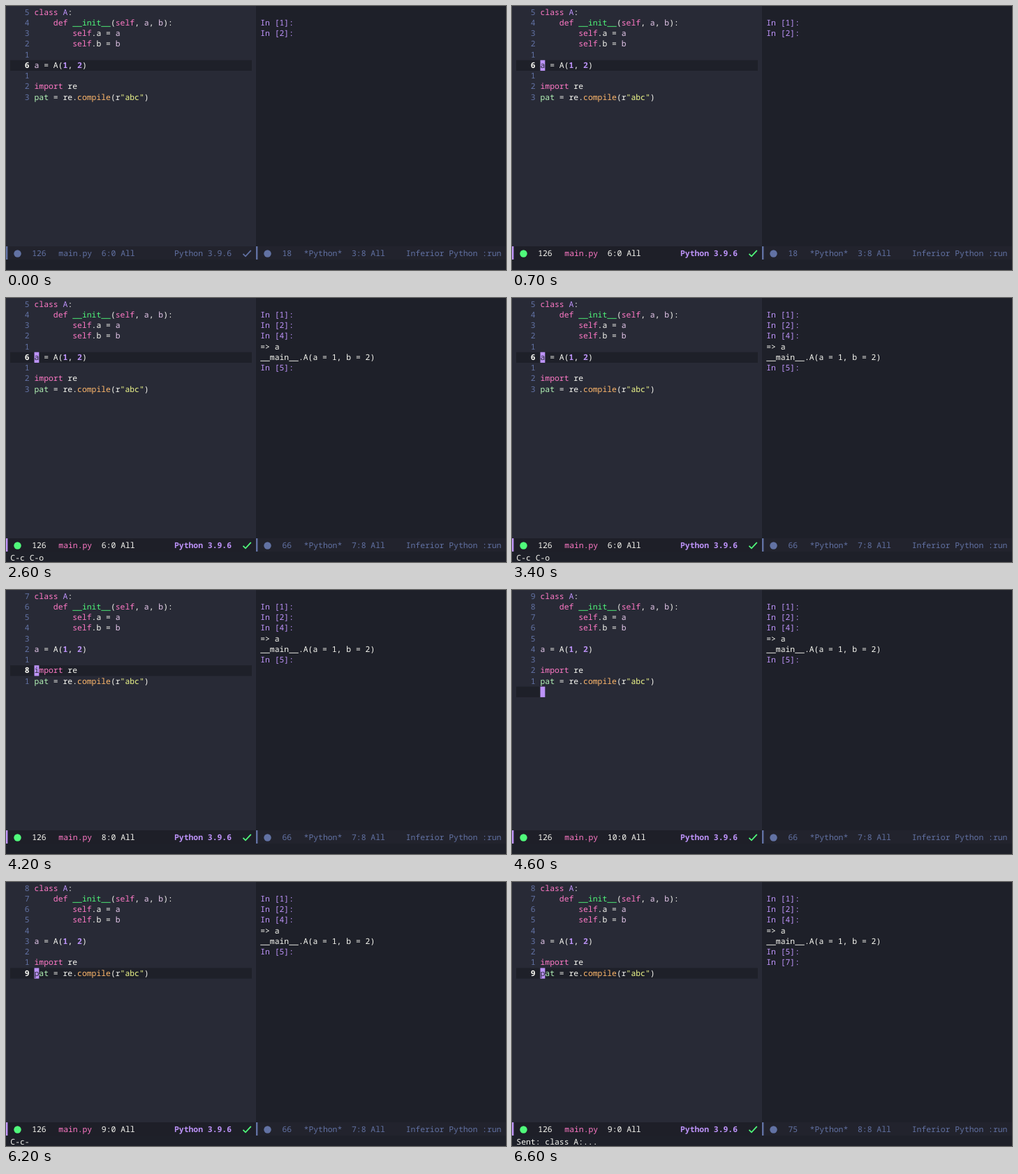
Write an HTML page with a canvas that moves like this. It is 716 px wide and 379 px high and loops after 8000 ms.

```html
<!DOCTYPE html>
<html lang="en">
<head>
<meta charset="utf-8">
<title>Python editor and console</title>
<style>
html, body { margin: 0; width: 100%; height: 100%; overflow: hidden; background: #1e2029; }
canvas { display: block; width: 716px; height: 379px; }
</style>
</head>
<body>
<canvas id="stage"></canvas>
<script>
const W = 716, H = 379, LOOP = 8000;
const CHAR = 6.84, ROW = 15.24, BASE = 12.7;
const LEFT = 6.3, CODE = LEFT + 5 * CHAR, RIGHT = 364.2;
const FONT = '11.4px "Noto Sans Mono", "DejaVu Sans Mono", monospace';

const C = {
  bg: '#282a36', dark: '#1e2029', bar: '#22232d', barOn: '#1e1f28',
  fg: '#f8f8f2', dim: '#6272a4', pink: '#ff79c6', purple: '#bd93f9',
  green: '#50fa7b', orange: '#ffb86c', yellow: '#f1fa8c',
  param: '#e6c8ec', name: '#b4f5b8'
};

// Each line is a list of [text, colour, bold] runs.
const code = [
  [['class', 'pink'], [' A', 'purple'], [':', 'fg']],
  [['    def', 'pink'], [' __init__', 'green'], ['(', 'fg'], ['self', 'pink'], [', ', 'fg'],
   ['a', 'param'], [', ', 'fg'], ['b', 'param'], ['):', 'fg']],
  [['        self', 'pink'], ['.a = ', 'fg'], ['a', 'param']],
  [['        self', 'pink'], ['.b = ', 'fg'], ['b', 'param']],
  [],
  [['a', 'param'], [' = A(', 'fg'], ['1', 'purple', true], [', ', 'fg'], ['2', 'purple', true], [')', 'fg']],
  [],
  [['import', 'pink'], [' re', 'fg']],
  [['pat', 'name'], [' = re.', 'fg'], ['compile', 'orange'], ['(r', 'fg'], ['"abc"', 'yellow'], [')', 'fg']]
];

const prompt = n => ['In [' + n + ']:', 'purple'];
const output = [
  prompt(1), prompt(2), prompt(4), ['=> a', 'fg'],
  ['__main__.A(a = 1, b = 2)', 'fg'], prompt(5), prompt(7)
];

// Changes applied in order of time.
const steps = [
  { at: 0, active: false, line: 6, shown: 2, size: 18, pos: '3:8', echo: '' },
  { at: 600, active: true },
  { at: 1200, echo: 'C-c-' },
  { at: 1400, echo: 'Sent: class A:...', shown: 3, size: 27, pos: '4:8' },
  { at: 2000, echo: 'C-c-' },
  { at: 2600, echo: 'C-c C-o', shown: 6, size: 66, pos: '7:8' },
  { at: 3900, line: 7, echo: '' },
  { at: 4100, line: 8 },
  { at: 4300, line: 9 },
  { at: 4500, line: 10 },
  { at: 4800, line: 9 },
  { at: 5500, echo: 'Compiled regular expression object.' },
  { at: 6200, echo: 'C-c-' },
  { at: 6500, echo: 'Sent: class A:...', shown: 7, size: 75, pos: '8:8' }
];

const canvas = document.getElementById('stage');
const ctx = canvas.getContext('2d');
const ratio = window.devicePixelRatio || 1;
canvas.width = W * ratio;
canvas.height = H * ratio;
ctx.scale(ratio, ratio);
ctx.textRendering = 'geometricPrecision';

function rect(x, y, w, h, color) {
  ctx.fillStyle = C[color];
  ctx.fillRect(x, y, w, h);
}

function text(str, x, y, color, bold) {
  ctx.font = (bold ? 'bold ' : '') + FONT;
  ctx.fillStyle = C[color];
  ctx.fillText(str, x, y);
}

function dot(x, color) {
  ctx.fillStyle = C[color];
  ctx.beginPath();
  ctx.arc(x, 355.5, 5.2, 0, 2 * Math.PI);
  ctx.fill();
}

function check(color) {
  ctx.strokeStyle = C[color];
  ctx.lineWidth = 1.8;
  ctx.beginPath();
  ctx.moveTo(339.5, 355.8);
  ctx.lineTo(343, 359.3);
  ctx.lineTo(350.8, 350.8);
  ctx.stroke();
}

function drawEditor(s) {
  const cur = s.line - 1, top = 1.5 + cur * ROW, last = cur === code.length;
  rect(0, 0, 358, 345, 'bg');
  rect(6, top, last ? CODE - 6 : 346, ROW, 'dark');
  code.forEach((runs, i) => {
    const y = BASE + i * ROW, here = i === cur;
    text(String(here ? s.line : Math.abs(i - cur)), LEFT + 3 * CHAR, y, here ? 'fg' : 'dim', here);
    let x = CODE;
    for (const [str, color, bold] of runs) {
      text(str, x, y, color, bold);
      x += str.length * CHAR;
    }
  });
  if (!s.active) return;
  rect(CODE, top, CHAR, ROW, 'purple');
  if (!last && code[cur].length) text(code[cur][0][0][0], CODE, BASE + cur * ROW, 'bg');
}

function drawConsole(s) {
  rect(358, 0, 358, 345, 'dark');
  output.slice(0, s.shown).forEach(([str, color], i) =>
    text(str, RIGHT, BASE + (i + 1) * ROW, color));
}

function drawBars(s) {
  const y = 359.4, pick = color => s.active ? color : 'dim';
  rect(0, 345, 358, 19, s.active ? 'barOn' : 'bar');
  rect(0, 345, 2.4, 19, pick('purple'));
  dot(16.5, pick('green'));
  text('126', 37.2, y, pick('fg'));
  text('main.py', 75.3, y, pick('pink'));
  text(s.line + ':0 All', 136.8, y, pick('fg'));
  text('Python 3.9.6', 241, y, pick('purple'), s.active);
  check(pick('green'));

  rect(358, 345, 358, 19, 'bar');
  rect(358, 345, 2.4, 19, 'dim');
  dot(374.5, 'dim');
  text(String(s.size), 395.4, y, 'dim');
  text('*Python*', 426.6, y, 'dim');
  text(s.pos + ' All', 495, y, 'dim');
  text('Inferior Python :run', 572.7, y, 'dim');
}

function draw(now) {
  const t = now % LOOP;
  const s = Object.assign({}, ...steps.filter(step => step.at <= t));
  drawEditor(s);
  drawConsole(s);
  drawBars(s);
  rect(0, 364, W, 15, 'dark');
  text(s.echo, LEFT, 376.6, 'fg');
}

let start;
function tick(now) {
  if (start === undefined) start = now;
  draw(now - start);
  requestAnimationFrame(tick);
}
draw(0);
requestAnimationFrame(tick);
</script>
</body>
</html>
```
